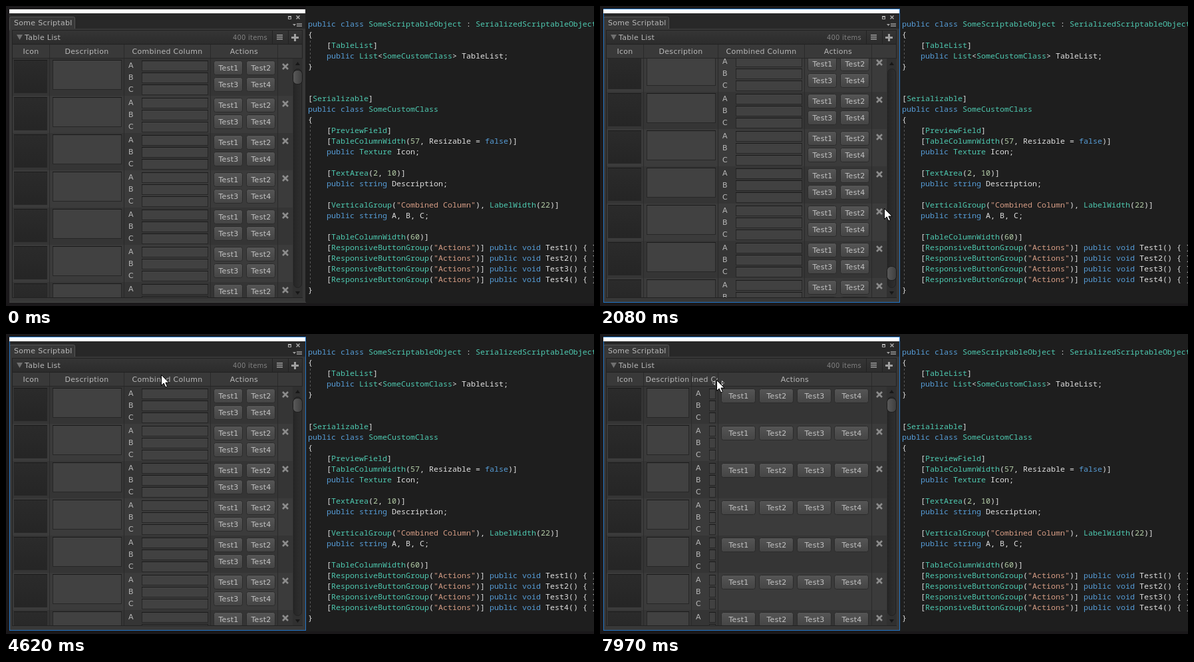
Animation of 884x451 px, one loop 8 s. Source, as an HTML page with a canvas:

```html
<!DOCTYPE html>
<html lang="en">
<head>
<meta charset="utf-8">
<title>Table list inspector</title>
<style>
  html, body { margin: 0; width: 100%; height: 100%; overflow: hidden; background: #1e1e1e; }
  canvas { display: block; }
</style>
</head>
<body>
<canvas id="stage" width="884" height="451"></canvas>
<script>
const ctx = document.getElementById('stage').getContext('2d');
const LOOP = 8000, STEP = 30;
const UI = '11px "DejaVu Sans", sans-serif';
const SMALL = '10px "DejaVu Sans", sans-serif';
const CODE = '11.667px "Noto Sans Mono", monospace';
const BLUE = '#2277c8';
const VIEW = { top: 79, bottom: 438 };
const ROW = 56, THUMB_TRAVEL = 308;
const SCROLL_RANGE = 400 * ROW + 8 - (VIEW.bottom - VIEW.top);
const DRAG_A = 5260, PUSHED = 5800, DRAG_B = 7630;

// Turning points of the pointer: time, x, y
const POINTER = [
  [40, 757, 407], [750, 438, 106], [1000, 438, 106], [1976, 443, 426], [2233, 398, 80],
  [2640, 432, 60], [3077, 434, 416], [3800, 420, 38], [4145, 396, 46], [4820, 182, 66],
  [DRAG_A, 182, 66], [PUSHED, 318, 68], [6846, 74, 66], [6990, 74, 66], [7100, 34, 44],
  [7430, 346, 68], [DRAG_B, 346, 68], [7960, 175, 69]
];
// Turning points of the scroll thumb: time, distance from the top
const THUMB = [[1000, 0], [2021, THUMB_TRAVEL], [2469, 0], [2900, 0], [3300, THUMB_TRAVEL], [3850, 0]];

const SOURCE = `public class SomeScriptableObject : SerializedScriptableObject
{
    [TableList]
    public List<SomeCustomClass> TableList;
}


[Serializable]
public class SomeCustomClass
{
    [PreviewField]
    [TableColumnWidth(57, Resizable = false)]
    public Texture Icon;

    [TextArea(2, 10)]
    public string Description;

    [VerticalGroup("Combined Column"), LabelWidth(22)]
    public string A, B, C;

    [TableColumnWidth(60)]
    [ResponsiveButtonGroup("Actions")] public void Test1() { }
    [ResponsiveButtonGroup("Actions")] public void Test2() { }
    [ResponsiveButtonGroup("Actions")] public void Test3() { }
    [ResponsiveButtonGroup("Actions")] public void Test4() { }
}`.split('\n');

const SYNTAX = [
  ['#d69d85', /^"[^"]*"/],
  ['#569cd6', /^(public|class|string|void|false)\b/],
  ['#4ec9b0', /^(Some\w+|Serialized\w+|LabelWidth|Texture|List(?=<))/],
  ['#b5cea8', /^\d+/],
  ['#e0e0e0', /^(\w+|\s+|.)/]
];

const clamp = (v, low, high) => Math.max(low, Math.min(high, v));

function sample(track, t) {
  const next = track.findIndex(key => key[0] > t);
  if (next === 0) return track[0].slice(1);
  if (next < 0) return track[track.length - 1].slice(1);
  const a = track[next - 1], b = track[next];
  const k = (1 - Math.cos(Math.PI * (t - a[0]) / (b[0] - a[0]))) / 2;
  return a.slice(1).map((v, i) => Math.round(v + (b[i + 1] - v) * k));
}

// The first divider pushes the second one along; the second is dragged back later.
function dividers(t, x) {
  const a = t < DRAG_A ? 177 : t > 6846 ? 137 : clamp(x - 5, 137, 308);
  if (t >= DRAG_B) return [a, clamp(x + 2, a + 40, 348)];
  return [a, t < PUSHED ? Math.max(307, a + 40) : 348];
}

function rect(x, y, w, h, color) {
  ctx.fillStyle = color;
  ctx.fillRect(x, y, w, h);
}

function shape(points, fill, stroke) {
  ctx.beginPath();
  points.forEach(([x, y]) => ctx.lineTo(x, y));
  ctx.closePath();
  ctx.fillStyle = fill;
  ctx.fill();
  if (!stroke) return;
  ctx.lineWidth = 1;
  ctx.strokeStyle = stroke;
  ctx.stroke();
}

function cross(x, y, r, width, color) {
  ctx.beginPath();
  ctx.moveTo(x - r, y - r); ctx.lineTo(x + r, y + r);
  ctx.moveTo(x + r, y - r); ctx.lineTo(x - r, y + r);
  ctx.lineWidth = width;
  ctx.strokeStyle = color;
  ctx.stroke();
}

function label(text, x, y, { color = '#b8b8b8', font = UI, align = 'left', spacing = '0.3px' } = {}) {
  ctx.font = font;
  ctx.letterSpacing = spacing;
  ctx.textAlign = align;
  ctx.fillStyle = color;
  ctx.fillText(text, x, y);
}

function clipped(x, y, w, h, draw) {
  ctx.save();
  ctx.beginPath();
  ctx.rect(x, y, w, h);
  ctx.clip();
  draw();
  ctx.restore();
}

function gradient(x0, y0, x1, y1, from, to) {
  const g = ctx.createLinearGradient(x0, y0, x1, y1);
  g.addColorStop(0, from);
  g.addColorStop(1, to);
  return g;
}

function rounded(x, y, w, h, r, fill, stroke) {
  ctx.beginPath();
  ctx.roundRect(x + .5, y + .5, w - 1, h - 1, r);
  ctx.fillStyle = fill;
  ctx.fill();
  ctx.lineWidth = 1;
  ctx.strokeStyle = stroke;
  ctx.stroke();
}

function field(x, y, w, h, fill = '#414141') {
  if (w < 2) return;
  rect(x, y, w, h, '#272727');
  rect(x, y, w, 1, '#1b1b1b');
  rect(x + 1, y + 1, w - 2, h - 2, fill);
}

function button(text, x, y, w) {
  rounded(x - 1, y, w + 1, 22, 3, gradient(0, y, 0, y + 22, '#565656', '#444444'), '#2b2b2b');
  label(text, x + w / 2, y + 15, { align: 'center', color: '#c4c4c4' });
}

function drawCode() {
  rect(451, 0, 433, 451, '#1e1e1e');
  ctx.strokeStyle = '#5a5a5a';
  ctx.lineWidth = 1;
  ctx.setLineDash([3, 3]);
  ctx.beginPath();
  for (const [from, to] of [[52, 84], [180, 420]]) {
    ctx.moveTo(457.5, from);
    ctx.lineTo(457.5, to);
  }
  ctx.stroke();
  ctx.setLineDash([]);
  SOURCE.forEach((line, row) => {
    let col = 0, last = '';
    while (col < line.length) {
      const rest = line.slice(col);
      const [color, pattern] = SYNTAX.find(([, p]) => p.test(rest));
      const word = rest.match(pattern)[0];
      const tint = last === '[' ? '#4ec9b0' : color;
      label(word, 454 + col * 7, 31 + row * 16, { color: tint, font: CODE, spacing: '0px' });
      col += word.length;
      last = word;
    }
  });
}

function drawWindow(focused) {
  rect(0, 0, 451, 451, '#1b191b');
  rect(0, 447, 884, 4, '#1a181a');
  rect(5, 4, 446, 442, '#383838');
  rect(5, 4, 446, 1, focused ? BLUE : '#1e1e1e');
  rect(5, 5, 445, 6, '#ffffff');
  rect(6, 11, 444, 23, '#282828');
  rounded(5, 16, 99, 22, 2, '#383838', '#555555');
  rect(6, 34, 444, 4, '#383838');
  label('Some Scriptabl', 12, 29);

  ctx.strokeStyle = '#b0b0b0';
  ctx.lineWidth = 1;
  ctx.strokeRect(424.5, 15.5, 4, 4);
  rect(424, 15, 5, 2, '#b0b0b0');
  cross(439, 17, 2.5, 1.3, '#b0b0b0');
  shape([[431, 27], [436, 27], [433.5, 30]], '#a0a0a0');
  for (const y of [26, 28, 30]) rect(437, y, 8, 1, '#a0a0a0');

  rect(9, 36, 437, 403, '#222222');
  rect(10, 37, 435, 20, gradient(0, 37, 0, 57, '#353535', '#2c2c2c'));
  shape([[16, 43], [25, 43], [20.5, 51]], '#707070');
  label('Table List', 28, 51);
  label('400 items', 341, 51, { font: SMALL, color: '#808080', spacing: '0.2px' });
  for (const x of [400, 424]) rect(x, 37, 1, 20, '#222222');
  for (const y of [43, 46, 49]) rect(407, y, 9, 1.5, '#a0a0a0');
  rect(433, 42, 3, 11, '#a0a0a0');
  rect(429, 46, 11, 3, '#a0a0a0');

  rect(450, 4, 1, 442, focused ? BLUE : '#202020');
  rect(5, 445, 446, 1, focused ? BLUE : '#454545');
  if (focused) rect(5, 11, 1, 435, BLUE);
}

function drawHeader(a, b) {
  rect(10, 58, 435, 20, '#393939');
  const columns = [['Icon', 10, 65], ['Description', 66, a], ['Combined Column', a + 1, b], ['Actions', b + 1, 408]];
  for (const [title, left, right] of columns) {
    clipped(left, 58, right - left, 20, () =>
      label(title, (left + right) / 2, 72, { align: 'center' }));
  }
}

function drawRow(y, height, index, a, b, perLine) {
  rect(10, y, 421, height, index % 2 ? '#3b3b3b' : '#353535');
  field(12, y + 2, 50, 50, gradient(0, y + 2, 0, y + 52, '#2b2b2b', '#252525'));
  field(70, y + 2, a - 73, 45);
  ['A', 'B', 'C'].forEach((name, i) => {
    label(name, a + 7, y + 14 + i * 18);
    field(a + 27, y + 3 + i * 18, b - a - 30, 16);
  });
  const left = b + 6, inner = 404 - left;
  for (let i = 0; i < 4; i++) {
    const line = Math.floor(i / perLine);
    const count = Math.min(perLine, 4 - line * perLine);
    const w = (inner - (count - 1) * 6) / count;
    const x = left + (i % perLine) * (w + 6);
    button('Test' + (i + 1), Math.round(x), y + 3 + line * 25, Math.round(w));
  }
  cross(420, y + 12, 4, 2.6, '#8c8c8c');
}

function drawList(a, b, scroll) {
  const perLine = clamp(Math.floor((404 - b) / 48), 1, 4);
  const height = Math.max(ROW, Math.ceil(4 / perLine) * 25 + 3);
  clipped(10, VIEW.top, 435, VIEW.bottom - VIEW.top, () => {
    let index = Math.floor(scroll / height);
    for (let y = VIEW.top + index * height - scroll; y < VIEW.bottom; y += height) {
      drawRow(y, height, index++, a, b, perLine);
    }
  });
  for (const x of [65, a, b, 408]) rect(x, 58, 1, 380, '#2a2a2a');
  rect(10, 78, 435, 1, '#262626');
}

function drawScrollbar(thumb) {
  rect(431, 79, 15, 359, '#303030');
  rounded(432, 94, 13, 330, 6, gradient(432, 0, 445, 0, '#252525', '#303030'), '#222222');
  shape([[435, 89], [442, 89], [438.5, 84]], '#171717');
  shape([[435, 429], [442, 429], [438.5, 434]], '#171717');
  rounded(431, 96 + thumb, 15, 22, 6, gradient(431, 0, 446, 0, '#5c5c5c', '#3c3c3c'), '#1c1c1c');
}

function drawPointer(x, y, resizing) {
  ctx.save();
  ctx.translate(x + .5, y + .5);
  if (resizing) {
    for (const [base, tip] of [[-3, -6], [8, 11]]) {
      shape([[base, 1], [tip, 4], [base, 7]], '#000', '#ddd');
    }
  }
  shape([[0, 0], [0, 16], [3.7, 12.5], [6.4, 18.5], [9, 17.4], [6.4, 11.6], [11.5, 11.6]], '#fff', '#000');
  ctx.restore();
}

function render(t) {
  const [x, y] = sample(POINTER, t);
  const [a, b] = dividers(t, x);
  const [thumb] = sample(THUMB, t);
  drawCode();
  drawWindow(t >= 950);
  drawHeader(a, b);
  drawList(a, b, Math.round(thumb / THUMB_TRAVEL * SCROLL_RANGE));
  drawScrollbar(thumb);
  const resizing = (t >= 4870 && t < PUSHED) || t >= 7430;
  if (t >= 40) drawPointer(x, y, resizing);
}

function tick() {
  const now = performance.now() % LOOP;
  render(Math.floor((now - 5) / STEP) * STEP + 10);
  requestAnimationFrame(tick);
}
tick();
</script>
</body>
</html>
```
